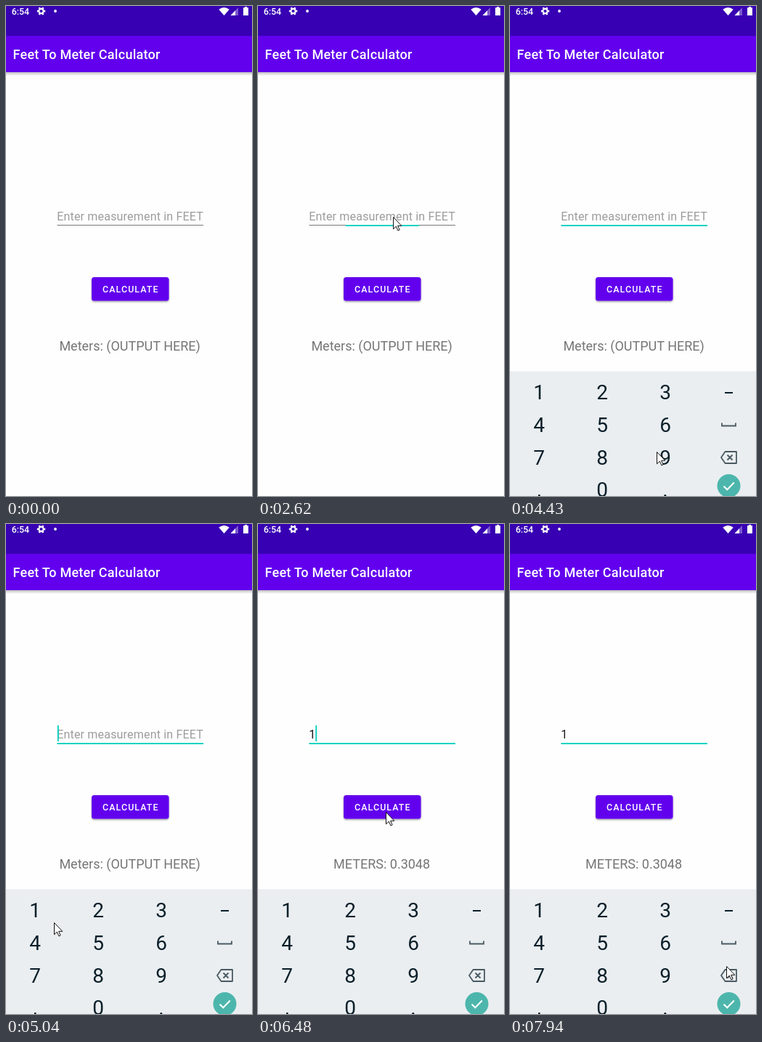
Write an HTML page that moves like this. It is 339x674 px and loops after 7.99 s.

```html
<!DOCTYPE html>
<html lang="en">
<head>
<meta charset="utf-8">
<title>Feet To Meter Calculator</title>
<style>
  html, body { margin: 0; width: 100%; height: 100%; overflow: hidden; background: #fefefe; }
  svg { display: block; width: 339px; height: 674px; font-family: Roboto, sans-serif; }
  .medium { font-weight: 500; fill: #fff; }
  .field { font-size: 16px; letter-spacing: .19px; }
  .icon { fill: none; stroke: #4a5a62; stroke-width: 1.8; }
</style>
</head>
<body>
<svg viewBox="0 0 339 674">
  <defs>
    <linearGradient id="shade" x2="0" y2="1">
      <stop stop-color="#000" stop-opacity=".25"/>
      <stop offset="1" stop-color="#000" stop-opacity="0"/>
    </linearGradient>
    <filter id="lift" x="-10%" y="-20%" width="120%" height="160%">
      <feDropShadow dx="0" dy="1.4" stdDeviation=".9" flood-opacity=".4"/>
    </filter>
  </defs>

  <rect width="339" height="674" fill="#fefefe"/>
  <rect y="91" width="339" height="5" fill="url(#shade)"/>
  <rect width="339" height="41" fill="#3700b3"/>
  <rect y="41" width="339" height="50" fill="#6200ee"/>

  <g fill="#fff">
    <text class="medium" x="7.7" y="12" font-size="12.4">6:54</text>
    <g fill="none" stroke="#fff">
      <circle cx="48.5" cy="7" r="3.2" stroke-width="2.2"/>
      <circle cx="48.5" cy="7" r="4.8" stroke-width="1.8" pathLength="12" stroke-dasharray="1" stroke-dashoffset=".5"/>
    </g>
    <circle cx="68" cy="7" r="1.9"/>
    <path d="M293.3 4.8Q300.5 -.8 307.7 4.8L300.5 13Z"/>
    <path d="M320 2V13H309.5Z" opacity=".35"/>
    <path d="M316 6.2V13H309.5Z"/>
    <path d="M329 1h3v1.3h2V13h-7V2.3h2Z"/>
  </g>
  <text class="medium" x="9.5" y="73" font-size="18" letter-spacing=".26">Feet To Meter Calculator</text>

  <text id="hint" class="field" x="70.2" y="294.5" fill="#9c9c9c">Enter measurement in FEET</text>
  <text id="typed" class="field" x="70.2" y="294.5" fill="#1c1c1c">1</text>
  <rect x="70.5" y="301" width="201.5" height="1" fill="#777"/>
  <rect id="line" y="301" height="2" fill="#14d3c2"/>
  <rect id="caret" y="277" width="2" height="22" fill="#14d3c2"/>

  <rect x="118" y="373" width="106.5" height="32.5" rx="3.5" fill="#6200ee" filter="url(#lift)"/>
  <text class="medium" x="171.8" y="394.2" font-size="12.36" letter-spacing="1.1" text-anchor="middle">CALCULATE</text>
  <text id="output" x="170.6" y="474" font-size="18" text-anchor="middle" fill="#757575"></text>

  <g id="keyboard">
    <rect y="502.5" width="339" height="171.5" fill="#eaeef1"/>
    <g id="keys" font-size="28" text-anchor="middle" fill="#0b1f29"></g>
    <path d="M296 532h11" stroke="#0b1f29" stroke-width="2"/>
    <path class="icon" d="M292 573.5v4h19v-4"/>
    <path class="icon" d="M296.5 613H312V629H296.5L291 621ZM299.5 617.5l7 7m0-7l-7 7" stroke-linejoin="round"/>
    <circle cx="301.5" cy="660" r="16" fill="#4db6ac"/>
    <path d="M294.5 660.5l4.8 4.8 9.5-9.8" fill="none" stroke="#fff" stroke-width="2"/>
  </g>

  <path id="pointer" d="M.5 .5V16.8L4.3 13.2 6.9 18.9 9.1 17.9 6.6 12.3H11.8Z" fill="#fff" stroke="#111" stroke-linejoin="round"/>
</svg>
<script>
const LOOP = 7990, FOCUS = 2620, CARET = 2700, KEYBOARD = 3020, TYPED = 5380, RESULT = 6420;
const $ = id => document.getElementById(id);
const show = (id, on) => $(id).setAttribute('visibility', on ? 'visible' : 'hidden');
const clamp = k => Math.max(0, Math.min(1, k));
const lerp = (a, b, k) => a + (b - a) * k;

// The pointer rests between glides
const entry = { x: 310, y: 305 };
const glides = [
  { from: 1180, to: 1710, x: 204, y: 282 },
  { from: 1710, to: 2030, x: 186, y: 290 }, // input field
  { from: 3360, to: 3750, x: 182, y: 606 },
  { from: 3850, to: 4430, x: 202, y: 613 },
  { from: 4430, to: 5250, x: 40, y: 536 },  // key 1
  { from: 5430, to: 5760, x: 286, y: 628 },
  { from: 5760, to: 6180, x: 176, y: 396 }, // button
  { from: 6480, to: 6940, x: 174, y: 416 },
  { from: 7120, to: 7940, x: 298, y: 608 }  // backspace
];

function pointerAt(t) {
  return glides.reduce((p, g) => {
    const k = clamp((t - g.from) / (g.to - g.from)), ease = k * k * (3 - 2 * k);
    return { x: lerp(p.x, g.x, ease), y: lerp(p.y, g.y, ease) };
  }, entry);
}

['123', '456', '789', ',0.'].forEach((row, r) => [...row].forEach((key, c) => {
  const text = document.createElementNS('http://www.w3.org/2000/svg', 'text');
  text.setAttribute('x', 40 + 87 * c);
  text.setAttribute('y', 541.3 + 44.7 * r);
  text.textContent = key;
  $('keys').append(text);
}));

function draw(t) {
  const typed = t >= TYPED, blinkStart = typed ? TYPED : CARET;
  show('hint', !typed);
  show('typed', typed);
  show('keyboard', t >= KEYBOARD);
  show('caret', t >= CARET && (t - blinkStart) % 1000 < 500);
  $('caret').setAttribute('x', typed ? 79.2 : 70.8);

  const grow = t < FOCUS ? 0 : clamp(.5 + (t - FOCUS) / 240);
  $('line').setAttribute('x', 171.25 - 100.75 * grow);
  $('line').setAttribute('width', 201.5 * grow);
  $('output').textContent = t < RESULT ? 'Meters: (OUTPUT HERE)' : 'METERS: 0.3048';

  const { x, y } = pointerAt(t);
  show('pointer', t >= glides[0].from);
  $('pointer').setAttribute('transform', `translate(${Math.round(x)} ${Math.round(y)})`);
}

const start = performance.now();
function tick() {
  draw((performance.now() - start) % LOOP);
  requestAnimationFrame(tick);
}
tick();
</script>
</body>
</html>
```
